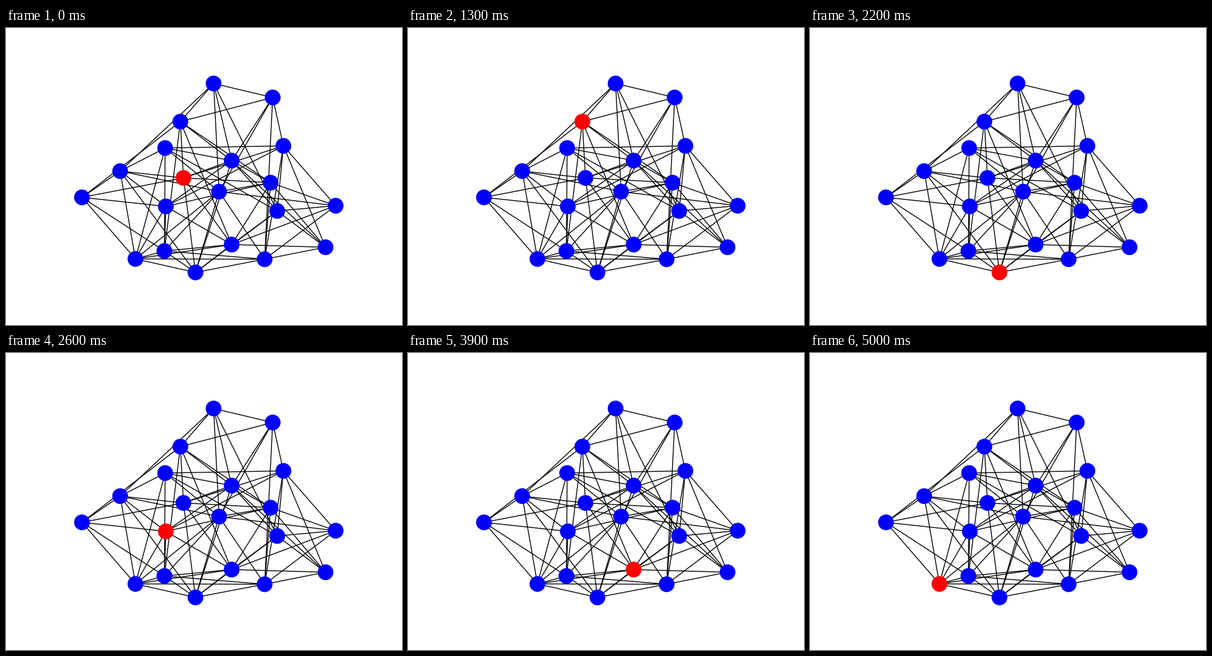
Write a matplotlib script that moves like this. It is 640 px wide and 480 px high and loops after 5100 ms.

```python
import matplotlib.pyplot as plt
from matplotlib.animation import FuncAnimation
from matplotlib.collections import LineCollection

WIDTH, HEIGHT, DPI = 640, 480, 100

# Node centres in pixels, y measured from the top
NODES = {
    "A": (335.5, 89.7), "B": (431, 112.3), "C": (281.8, 151.3),
    "D": (257.2, 194), "E": (448.3, 190.5), "F": (364.7, 214.3),
    "G": (184.5, 231.3), "H": (286.8, 242.3), "I": (427.6, 250),
    "J": (344.4, 264.4), "K": (122.8, 273.7), "L": (258.3, 288.3),
    "M": (438.3, 295.7), "N": (532.8, 287.2), "O": (364.7, 350),
    "P": (256, 360.4), "Q": (209.2, 373.2), "R": (418, 373.7),
    "S": (516.4, 354.3), "T": (306.2, 395),
}

# Each entry is a node followed by the neighbours listed from it
LINKS = (
    "A:BCFGJM B:CEFJR C:FHIKOP D:EFGJMPQ E:HLMNRS F:HILMST "
    "G:HJKLQT H:IKOT I:JLNORS J:NPQRT K:LPQ L:OPQ M:NOST "
    "N:OR O:PQST P:QRT Q:RT R:ST"
)

# Node visited at each step of the random walk
WALK = "HHIJRTHKLONEBCPJAGLISMTQKGLEDJBAFSRPTMIONRJIHCBFDGQ"

fig = plt.figure(figsize=(WIDTH / DPI, HEIGHT / DPI), dpi=DPI, facecolor="white")
ax = fig.add_axes([0, 0, 1, 1])
ax.set_xlim(0, WIDTH)
ax.set_ylim(HEIGHT, 0)
ax.axis("off")

edges = []
for entry in LINKS.split():
    start, ends = entry.split(":")
    edges += [(NODES[start], NODES[end]) for end in ends]
ax.add_collection(LineCollection(edges, colors="black", linewidths=1, zorder=1))

xs, ys = zip(*NODES.values())
dots = ax.scatter(xs, ys, s=300, linewidths=1, zorder=2)


def update(step):
    colors = ["red" if name == WALK[step] else "blue" for name in NODES]
    dots.set_facecolor(colors)
    dots.set_edgecolor(colors)
    return (dots,)


anim = FuncAnimation(fig, update, frames=len(WALK), interval=100,
                     repeat=True, repeat_delay=0)
plt.show()
```
